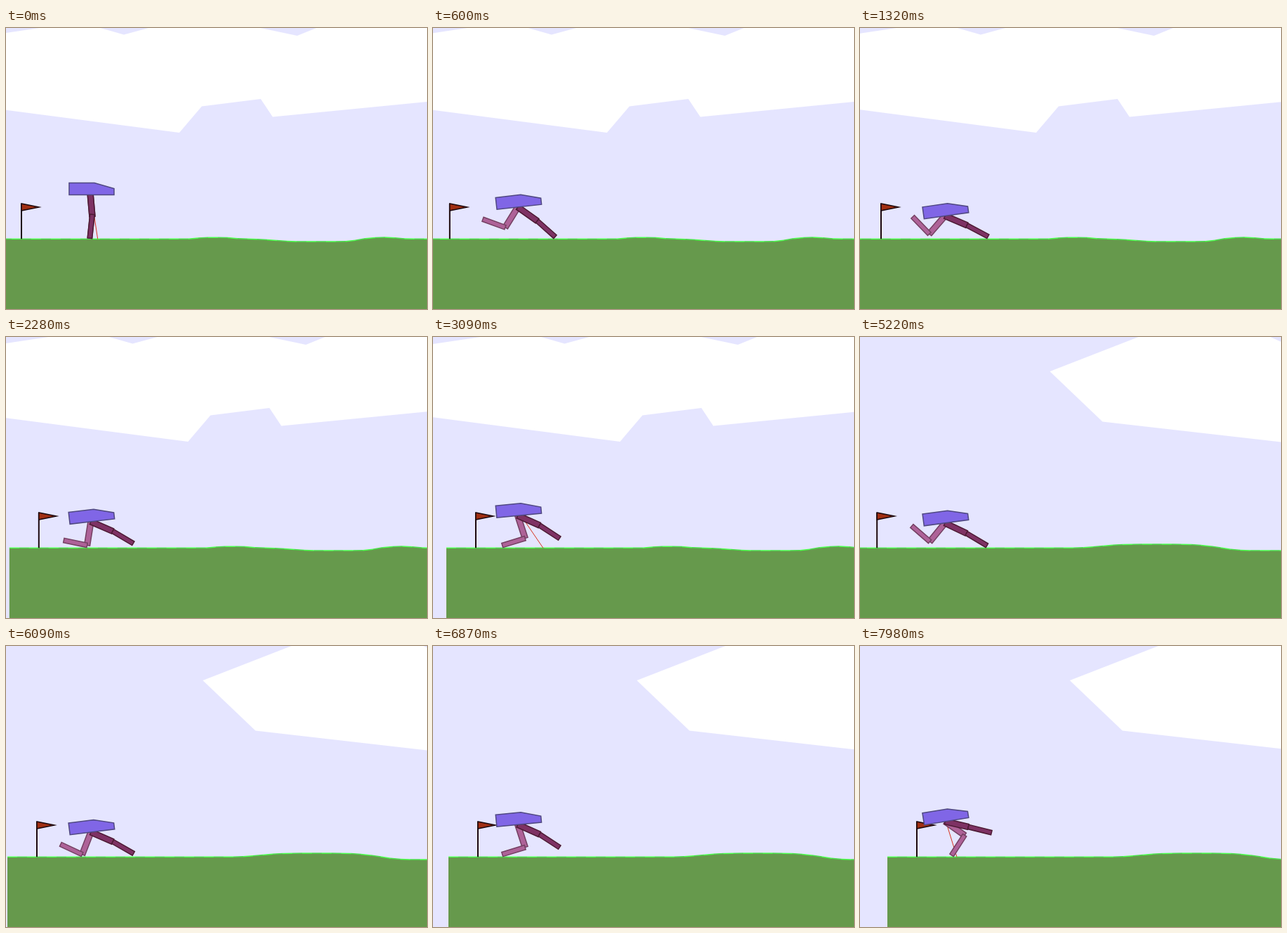
An HTML page with a canvas for the animation above (8 s loop, 600 by 400 pixels).

```html
<!DOCTYPE html>
<html lang="en">
<head>
<meta charset="utf-8">
<title>Walker</title>
<style>
  html, body { margin: 0; width: 100%; height: 100%; overflow: hidden; background: #e5e5ff; }
  canvas { display: block; width: 600px; height: 400px; }
</style>
</head>
<body>
<canvas width="600" height="400"></canvas>
<script>
const ctx = document.querySelector('canvas').getContext('2d');
const LOOP = 8000, STEP = 30, SECOND_START = 150;
const HULL_X = 120, GROUND = 300.3, FLAG_START = 22, TILE = 14;
const LEG = 34, THIGH_WIDTH = 8, SHIN_WIDTH = 6.4;
const HULL = [[-30, -9], [6, -9], [34, -1], [34, 8], [-30, 8]];
const rad = degrees => degrees * Math.PI / 180;

// Degrees, counterclockwise: thighs from straight down, knees from their thigh.
const pose = (turn, backThigh, backKnee, frontThigh, frontKnee, lift = 0) =>
  ({ turn, backThigh, backKnee, frontThigh, frontKnee, lift });
const STAND = pose(0, 5, -11, 5, -11);
const CROUCH = pose(8, -41, -95, 67, -5);
const SQUAT = pose(5.5, 18, -91, 66, -9);
const PUSH = pose(9.2, 55, -88, 77, -1);
const ROLL = pose(142, 202, -90, 119, -98, 6);

const key = (step, flagX, pose) => ({ step, flagX, ...pose });
const bump = (center, width, height) => x => height * Math.exp(-(((x - center) / width) ** 4));
const fall = [key(0, FLAG_START, STAND), key(25, 24.3, CROUCH)];

const episodes = [
  {
    keys: [...fall, key(44, 30, CROUCH), key(103, 61, SQUAT), key(115, 65, PUSH), key(139, 74, ROLL)],
    bumps: [bump(318, 30, -2), bump(465, 70, 3.8), bump(550, 30, -2.5)],
    cloud: [[-60, 16], [105, -8.5], [168, 9.5], [273, -19], [415, 11], [620, -72],
      [620, 103], [380, 126.5], [363, 101], [279, 111.5], [247, 149], [-60, 109]]
  },
  {
    keys: [...fall, key(40, 34, CROUCH), key(79, 64, SQUAT), key(116, 81, PUSH)],
    bumps: [bump(440, 85, -5.3), bump(600, 65, 3.8)],
    cloud: [[269.5, 49], [496, -39], [620, 16], [620, 152], [344.5, 120.5]]
  }
];

// Steps after the last key carry its motion on.
function stateAt(keys, step) {
  const found = keys.findIndex(k => k.step > step);
  const next = found < 0 ? keys.length - 1 : found;
  const a = keys[next - 1], b = keys[next];
  const f = (step - a.step) / (b.step - a.step);
  const state = {};
  for (const name in a) state[name] = a[name] + (b[name] - a[name]) * f;
  return state;
}

function line(x0, y0, x1, y1, color, width) {
  ctx.beginPath();
  ctx.moveTo(x0, y0);
  ctx.lineTo(x1, y1);
  ctx.strokeStyle = color;
  ctx.lineWidth = width;
  ctx.stroke();
}

function polygon(points, fill, outline) {
  ctx.beginPath();
  points.forEach(([x, y]) => ctx.lineTo(x, y));
  ctx.closePath();
  ctx.fillStyle = fill;
  ctx.fill();
  if (!outline) return;
  ctx.strokeStyle = outline;
  ctx.lineWidth = 1.5;
  ctx.stroke();
}

// A point turned counterclockwise on screen, then moved.
function place([x, y], angle, [dx, dy]) {
  const c = Math.cos(rad(angle)), s = Math.sin(rad(angle));
  return [dx + x * c + y * s, dy - x * s + y * c];
}

function bone(origin, angle, width) {
  const w = width / 2;
  return [[-w, 0], [w, 0], [w, LEG], [-w, LEG]].map(p => place(p, angle, origin));
}

function leg(hip, thigh, knee, slack) {
  const joint = place([0, LEG], thigh, hip);
  joint[1] -= slack;
  return [bone(hip, thigh, THIGH_WIDTH), bone(joint, thigh + knee, SHIN_WIDTH)];
}

// Builds the body around the hull, then rests its lowest corner on the ground.
function buildWalker(s) {
  const slack = Math.max(0, 3 - s.step);
  const hip = place([0, 8 - slack], s.turn, [0, 0]);
  const parts = {
    back: leg(hip, s.backThigh, s.backKnee, slack),
    front: leg(hip, s.frontThigh, s.frontKnee, slack),
    hull: HULL.map(p => place(p, s.turn, [0, 0]))
  };
  const corners = [...parts.back, ...parts.front, parts.hull].flat();
  const y = GROUND - 0.7 - s.lift - Math.max(...corners.map(p => p[1]));
  return { ...parts, y };
}

function drawWalker({ back, front, hull, y }) {
  ctx.save();
  ctx.translate(HULL_X, y);
  back.forEach(b => polygon(b, '#ae6298', '#744062'));
  front.forEach(b => polygon(b, '#7e3264', '#4c1a33'));
  polygon(hull, '#8066e6', '#4f4880');
  ctx.restore();
}

function drawGround(bumps, left) {
  const tops = [];
  for (let x = 0; x <= 644; x += TILE) {
    tops.push([left + x, bumps.reduce((y, b) => y + b(x), GROUND)]);
  }
  polygon([...tops, [left + 644, 400], [left, 400]], '#66994c');
  for (let i = 1; i < tops.length; i++) {
    line(...tops[i - 1], ...tops[i], i % 2 ? '#4cff4c' : '#4ce04c', 1.5);
  }
}

// A range-finder ray sweeps out and back during the first 20 of every 100 steps.
function drawRay(step, hullY) {
  const i = (step + 1) % 100;
  if (i >= 20) return;
  const angle = 0.15 * Math.min(i, 19 - i);
  const length = Math.min(160, (GROUND - hullY) / Math.cos(angle));
  line(HULL_X, hullY, HULL_X + length * Math.sin(angle), hullY + length * Math.cos(angle), '#d8321e', 1);
}

function drawFlag(x) {
  line(x, 250, x, GROUND, '#1c080c', 2);
  polygon([[x, 250], [x, 260], [x + 25, 255]], '#a02e12', '#1c080c');
}

function render() {
  const tick = Math.floor(performance.now() % LOOP / STEP);
  const second = tick >= SECOND_START;
  const { keys, bumps, cloud } = episodes[second ? 1 : 0];
  const state = stateAt(keys, second ? tick - SECOND_START : tick);
  const walker = buildWalker(state);
  const drift = (state.flagX - FLAG_START) / 2;

  ctx.fillStyle = '#e5e5ff';
  ctx.fillRect(0, 0, 600, 400);
  polygon(cloud.map(([x, y]) => [x + drift, y]), '#fff');
  drawGround(bumps, state.flagX - 3 * TILE);
  drawRay(state.step, walker.y);
  drawFlag(state.flagX);
  drawWalker(walker);
  requestAnimationFrame(render);
}
render();
</script>
</body>
</html>
```
